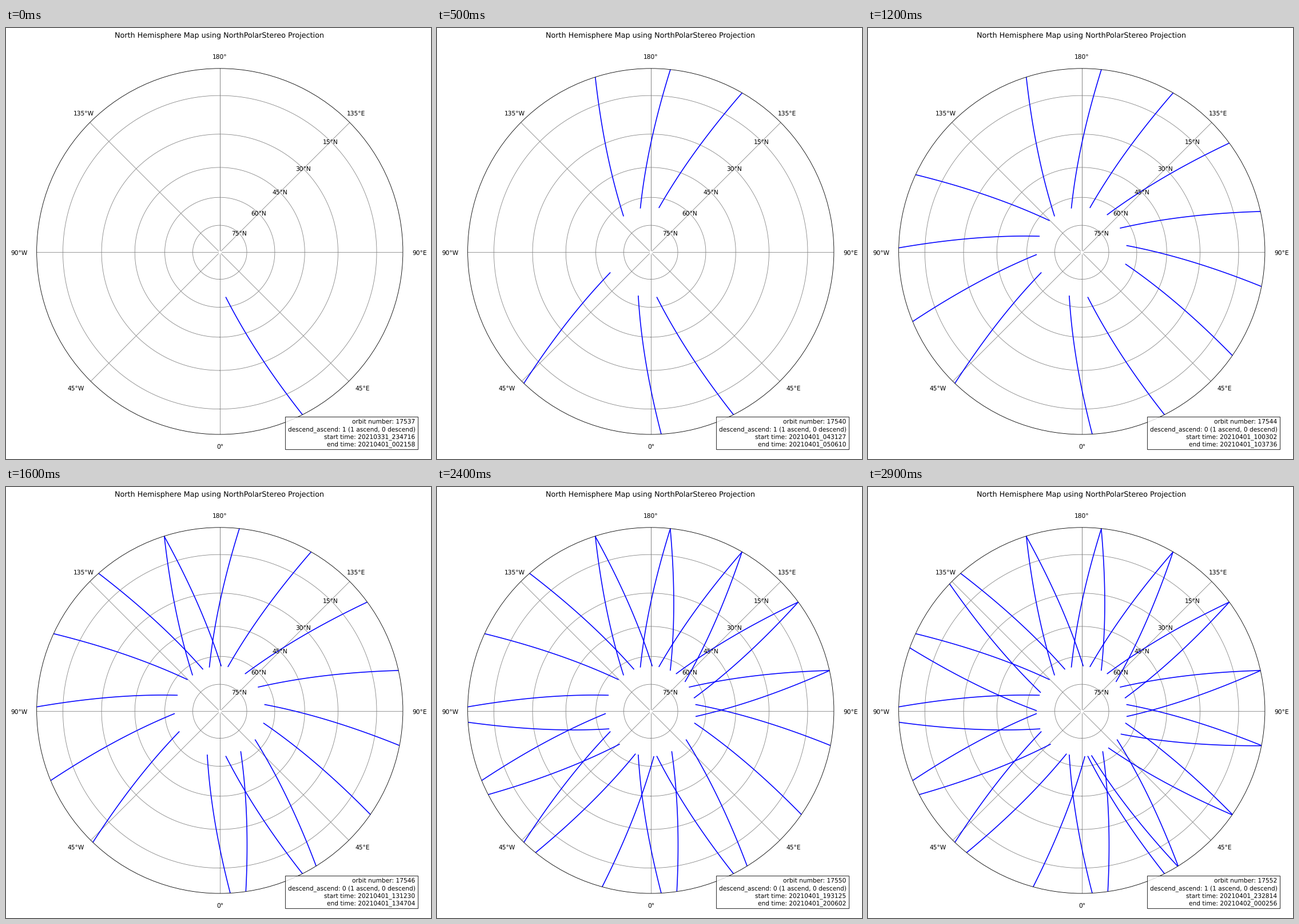
A matplotlib script for the animation above (3000 ms loop, 743 by 754 pixels).

```python
import numpy as np
import matplotlib.pyplot as plt
from matplotlib.animation import FuncAnimation
from matplotlib.patches import Circle, Rectangle

plt.rcParams["font.family"] = "DejaVu Sans"
plt.rcParams["text.hinting"] = "none"

W, H, DPI = 743, 754, 64
PT = 72 / DPI                       # points per pixel
POLE = (373.75, 392.4)
RIM, RIM_R = (373.75, 390.9), 320.1
SCALE = 356.8                       # projected radius of the equator
ECC = 0.0818192                     # WGS84 eccentricity

INCLINATION = np.radians(97.4)
DRIFT = 23.682                      # westward shift per orbit, degrees
TOP_LAT = np.radians(65)
FIRST_ORBIT, LAST_ORBIT = 17537, 17552
EPOCH = np.datetime64("2021-03-31T23:47:16")
MISSING = {(0, 0), (2, 1)}          # (orbit offset, ascending flag)


def project(lon, lat):
    """Polar stereographic pixel position; angles in radians."""
    s = ECC * np.sin(lat)
    r = SCALE * np.tan(np.pi / 4 - lat / 2) / ((1 - s) / (1 + s)) ** (ECC / 2)
    return POLE[0] + r * np.sin(lon), POLE[1] + r * np.cos(lon)


def ground_track(k, ascending):
    """Half pass between the equator and the highest latitude."""
    v = np.linspace(0, np.arcsin(np.sin(TOP_LAT) / np.sin(INCLINATION)), 80)
    lat = np.arcsin(np.sin(v) * np.sin(INCLINATION))
    node = 28.25 if ascending else 220.07
    if not ascending:
        v = -v
    lon = np.radians(node - DRIFT * k) - v * DRIFT / 360
    return project(lon + np.arctan(np.cos(INCLINATION) * np.tan(v)), lat)


def stamp(seconds):
    t = str(EPOCH + np.timedelta64(int(round(seconds)), "s"))
    return t.replace("-", "").replace(":", "").replace("T", "_")


def info_lines(k, ascending):
    wave = 2 * np.cos(2 * np.pi * (k - 7.8) / 15)
    if ascending:
        start, length = 5683.5 * k + 0.0245 * k * k, 2084.1 + wave
    else:
        start, length = 5683.75 * k - 2839.75, 2075.5 - wave
    start = round(start)
    return (f"orbit number: {FIRST_ORBIT + k}",
            f"descend_ascend: {ascending} (1 ascend, 0 descend)",
            f"start time: {stamp(start)}",
            f"end time: {stamp(start + round(length))}")


fig = plt.figure(figsize=(W / DPI, H / DPI), dpi=DPI, facecolor="white")
ax = fig.add_axes([0, 0, 1, 1])
ax.set_xlim(0, W)
ax.set_ylim(H, 0)
ax.axis("off")

rim = Circle(RIM, RIM_R, fill=False, ec="black", lw=0.85 * PT, zorder=2.5)
ax.add_patch(rim)


def curve(x, y, color, width, z):
    line, = ax.plot(x, y, color=color, lw=width * PT, zorder=z)
    line.set_clip_path(rim)
    return line


def label(x, y, text, size=10.64, ha="center"):
    return ax.text(x, y, text, fontsize=size * PT, ha=ha, va="baseline",
                   color="black", zorder=5)


# Graticule: the date line is drawn from both sides
for lon in range(-180, 181, 45):
    x, y = project(np.radians(lon), np.radians(np.array([0, 89])))
    curve(x, y, "gray", 0.8, 1)
turn = np.linspace(0, 2 * np.pi, 361)
for lat in range(15, 90, 15):
    curve(*project(turn, np.radians(lat)), "gray", 0.8, 1)
    x, y = project(np.radians(135), np.radians(lat))
    label(x, y + 3.9, f"{lat}°N")

label(373.5, 17.3, "North Hemisphere Map using NorthPolarStereo Projection", 12.77)
for x, y, text in ((373.5, 50, "180°"), (374, 732, "0°"),
                   (135.5, 149, "135°W"), (612, 149, "135°E"),
                   (23, 392.5, "90°W"), (723, 392.5, "90°E"),
                   (122.5, 629.5, "45°W"), (623.5, 629.5, "45°E")):
    label(x, y + 3.9, text)

passes = [(k, a) for k in range(LAST_ORBIT - FIRST_ORBIT + 1)
          for a in (0, 1) if (k, a) not in MISSING]
tracks = [curve(*ground_track(k, a), "blue", 1.6, 2) for k, a in passes]

ax.add_patch(Rectangle((488, 680), 232, 56.5, fc="white", ec="black",
                       lw=1.06 * PT, alpha=0.8, zorder=4))
info = [label(715.5, 692.3 + 12.9 * i, "", ha="right") for i in range(4)]


def update(frame):
    for i, track in enumerate(tracks):
        track.set_visible(i <= frame)
    for item, text in zip(info, info_lines(*passes[frame])):
        item.set_text(text)
    return tracks + info


anim = FuncAnimation(fig, update, frames=len(passes), interval=100,
                     repeat=True, repeat_delay=0, blit=False)
plt.show()
```
